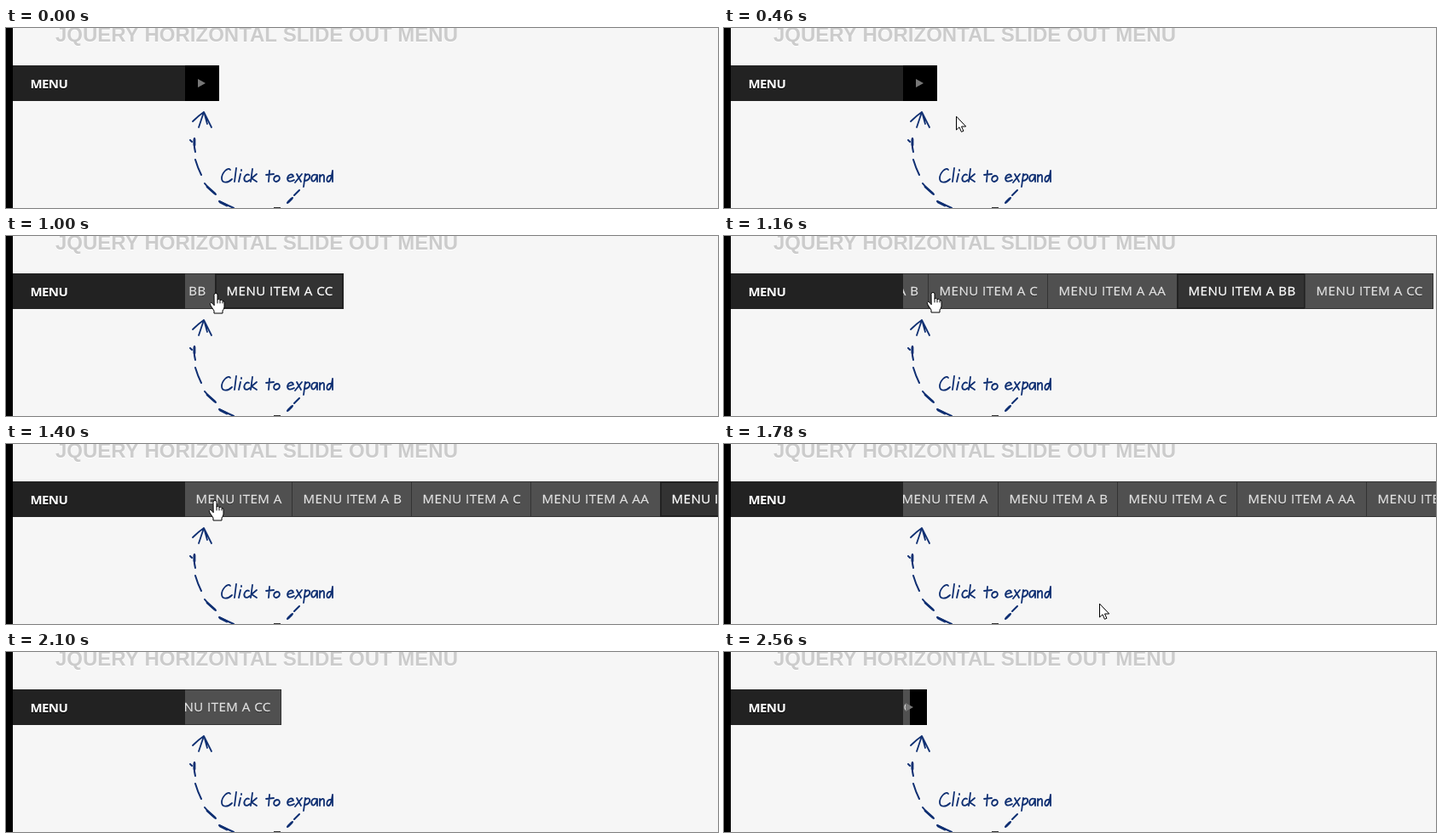
An HTML page with a canvas that plays this animation: 835 by 212 pixels, repeating every 2640 ms.

```html
<!DOCTYPE html>
<html lang="en">
<head>
<meta charset="utf-8">
<title>Slide out menu</title>
<style>
  html, body { margin: 0; width: 100%; height: 100%; overflow: hidden; background: #f6f6f6; }
  canvas { display: block; }
</style>
</head>
<body>
<canvas id="stage" width="835" height="212"></canvas>
<script>
const ctx = document.getElementById('stage').getContext('2d');
const LOOP = 2640;
// The picture only changes at these moments (ms).
const STEPS = [0, 220, 300, 380, 460, 540, 620, 700, 780, 860, 940, 1000, 1080, 1160,
  1240, 1320, 1400, 1780, 1860, 1940, 2020, 2100, 2180, 2480, 2560];
const ITEMS = [['A', 126], ['A B', 140], ['A C', 140], ['A AA', 152], ['A BB', 150], ['A CC', 150]];
const FULL = ITEMS.reduce((sum, item) => sum + item[1], 0);
const LEFT = 210, TOP = 44, HEIGHT = 42;
const INK = '#0f2f72';

const LETTERS = [
  'M263 167C260 163 253 171 253 177C253 183 260 183 265 178',
  'M270 165L268 181',
  'M275 172L273 181M276 167L276 168',
  'M285 173C281 171 278 177 280 180C282 182 285 180 286 179',
  'M289 166L287 181M294 172L288 177L294 181',
  'M309 168L308 181M305 173L314 172',
  'M318 174C313 175 313 181 317 181C322 180 322 174 318 174',
  'M331 177L337 175C336 171 331 172 330 177C330 182 335 181 338 179',
  'M341 172L346 181M347 172L339 182',
  'M351 172L349 187M351 174C355 170 358 174 355 178C353 180 351 180 350 179',
  'M364 173C359 171 357 177 359 180C362 182 364 177 365 173L365 181',
  'M368 173L368 181M368 176C370 172 373 172 373 175L373 181',
  'M381 174C376 173 375 181 378 181C381 181 382 174 383 168L383 181'
].map(d => new Path2D(d));
const ARROW_HEAD = new Path2D('M219 110Q226 103 232 99L241 117M232 99L226 117M233 102L236 113');
const DASHES = new Path2D('M216 132L218 134M221 130Q220 138 222 146M222 155Q225 165 229 173M233 183Q238 190 246 196M250 204Q258 208 267 212M330 206L336 200M338 197L344 191');
const HEAVY = new Path2D('M236 187L245 195M221 131L221 138M251 205L259 209M331 205L335 201');
const POINTER = new Path2D('M.5 .5V16L4 12.8L6.4 18.3L8.9 17.3L6.5 12H11.3Z');
const HAND = new Path2D('M-2 2Q-2 .5 0 .5Q2 .5 2 2V8Q4 6.5 5 8.5Q7 7.5 8 9.5Q10 9 10 11.5V17Q9 20 8 21V24H-2V21L-6 15Q-7.5 12 -5.5 11.5Q-4 11.5 -2 14.5Z');

const clamp = v => Math.min(1, Math.max(0, v));
const swing = p => 0.5 - Math.cos(Math.PI * clamp(p)) / 2;

function rect(color, x, y, w, h) {
  ctx.fillStyle = color;
  ctx.fillRect(x, y, w, h);
}

function text(str, x, y, font, color, shadow, spacing = 0, weight = 0) {
  ctx.font = font;
  ctx.letterSpacing = spacing + 'px';
  ctx.fillStyle = shadow;
  ctx.fillText(str, x, y + 1);
  ctx.fillStyle = ctx.strokeStyle = color;
  ctx.fillText(str, x, y);
  if (weight) {
    ctx.lineWidth = weight;
    ctx.strokeText(str, x, y);
  }
}

function stroke(path, width, color = INK) {
  ctx.strokeStyle = color;
  ctx.lineWidth = width;
  ctx.stroke(path);
}

function drawNote() {
  ctx.lineCap = ctx.lineJoin = 'round';
  LETTERS.forEach(path => stroke(path, 1.8));
  stroke(ARROW_HEAD, 1.8);
  stroke(DASHES, 2);
  stroke(HEAVY, 2.8);
  rect('#333', 314, 211, 8, 1);
}

function panelWidth(t) {
  if (t >= 2180) return 8;
  const open = t < 1741 ? swing((t - 855.1) / 470) : 1 - swing((t - 1741) / 470);
  return Math.round(FULL * open);
}

function buttonWidth(t) {
  return Math.round(40 * (t < 1500 ? 1 - swing((t - 780) / 120) : swing((t - 2434) / 200)));
}

function drawPanel(width, hovered) {
  let x = LEFT + width - FULL;
  ITEMS.forEach(([label, w], i) => {
    const active = i === hovered;
    rect(active ? '#222' : '#333', x - 1, TOP, w + 1, HEIGHT);
    if (active) rect('#333', x + 1, TOP + 2, w - 3, HEIGHT - 4);
    else rect('#505050', x, TOP + 1, w - 1, HEIGHT - 2);
    text('MENU ITEM ' + label, x + 12.5, 70, '500 15px "Open Sans", sans-serif',
      active ? '#fff' : '#e2e2e2', '#222', 0.5, 0.3);
    x += w;
  });
}

function drawMenu(t) {
  const width = panelWidth(t), button = buttonWidth(t);
  const hovered = t >= 940 && t <= 1000 ? 5 : t >= 1080 && t <= 1400 ? 4 : -1;
  ctx.save();
  ctx.beginPath();
  ctx.rect(LEFT, TOP, 625, HEIGHT);
  ctx.clip();
  rect('#000', LEFT, TOP, button, HEIGHT);
  if (width > 8) drawPanel(width, hovered);
  else if (width) {
    rect('#505050', LEFT, TOP, width, HEIGHT);
    ctx.beginPath();
    ctx.arc(217, 65, 5, Math.PI * 0.75, Math.PI * 1.25);
    ctx.strokeStyle = '#ddd';
    ctx.lineWidth = 1.3;
    ctx.stroke();
  }
  if (button) {
    const x = LEFT + button - 25;
    ctx.fillStyle = '#777';
    ctx.fill(new Path2D(`M${x} 60L${x + 9} 65L${x} 70Z`));
  }
  ctx.restore();
  rect('#222', 8, TOP, 202, HEIGHT);
  text('MENU', 28.5, 71, 'bold 15px "Open Sans", sans-serif', '#fff', '#000', -0.6);
}

function drawCursor(shape, x, y) {
  ctx.save();
  ctx.translate(Math.round(x), Math.round(y));
  ctx.lineJoin = 'round';
  ctx.fillStyle = '#fff';
  ctx.fill(shape);
  stroke(shape, 1, '#000');
  if (shape === HAND) stroke(new Path2D('M2 8V12M5 9V12M8 10V12'), 1, '#000');
  ctx.restore();
}

function placeCursor(t) {
  if (t >= 220 && t <= 700) {
    const left = (700 - t) / 480;
    drawCursor(POINTER, 259 + 32 * left ** 1.3, 81 + 119 * left ** 2.37);
  } else if (t >= 780 && t <= 1400) {
    const left = clamp((1160 - t) / 380);
    drawCursor(HAND, 245 + 3 * left, 66 + 2.4 * left);
  } else if (t === 1780) {
    drawCursor(POINTER, 440, 188);
  }
}

function draw(now) {
  const time = now % LOOP;
  const t = STEPS.findLast(step => step <= time);
  rect('#f6f6f6', 0, 0, 835, 212);
  rect('#000', 0, 0, 8, 212);
  text('JQUERY HORIZONTAL SLIDE OUT MENU', 58, 16,
    'bold 24px "Liberation Sans", Arial, sans-serif', '#ccc', '#fff');
  drawNote();
  drawMenu(t);
  placeCursor(t);
}

const start = performance.now();
function tick() {
  draw(performance.now() - start);
  requestAnimationFrame(tick);
}
tick();
</script>
</body>
</html>
```
